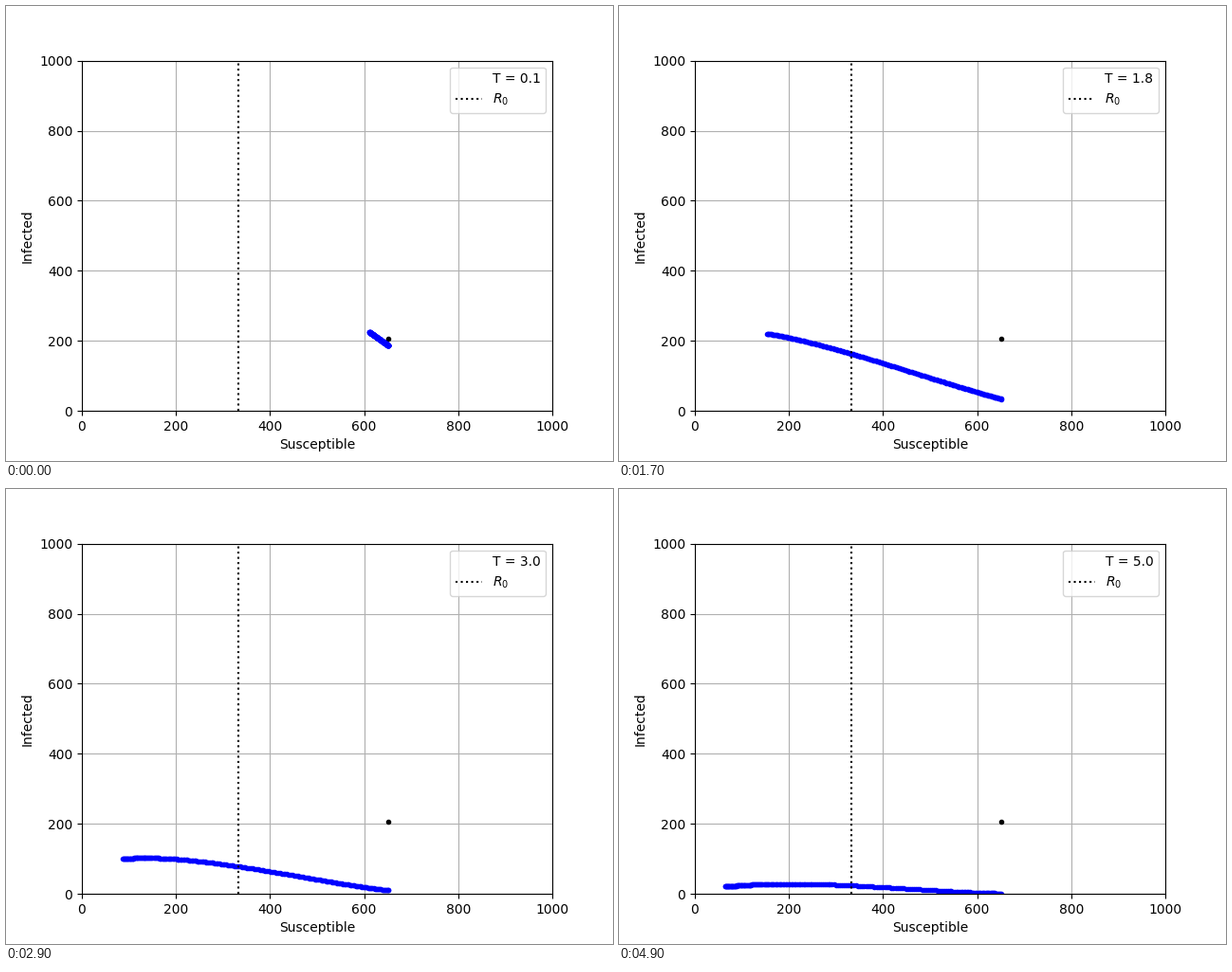
A matplotlib script for the animation above (5000 ms loop, 640 by 480 pixels).

```python
import numpy as np
import matplotlib.pyplot as plt
from matplotlib.animation import FuncAnimation

POPULATION = 1000
BETA = 3.0
GAMMA = 1.0
FRAMES = 50
SUBSTEPS = 20
STEP = 0.1 / SUBSTEPS


def slope(state, beta):
    s, i = state
    infections = beta * s * i / POPULATION
    return np.array([-infections, infections - GAMMA * i])


def advance(state, beta, steps):
    """Integrate the SIR equations with fourth-order Runge-Kutta."""
    for _ in range(steps):
        k1 = slope(state, beta)
        k2 = slope(state + STEP / 2 * k1, beta)
        k3 = slope(state + STEP / 2 * k2, beta)
        k4 = slope(state + STEP * k3, beta)
        state = state + STEP / 6 * (k1 + 2 * k2 + 2 * k3 + k4)
    return state


# The epidemic runs freely for three time units before policies diverge.
start = advance(np.array([POPULATION - 1.0, 1.0]), BETA, 30 * SUBSTEPS)

# Each point of the front has its own constant infection rate.
rates = np.linspace(0, BETA, 200)
front = np.repeat(start[:, None], rates.size, axis=1)
fronts = []
for _ in range(FRAMES):
    front = advance(front, rates, SUBSTEPS)
    fronts.append(front)

fig, ax = plt.subplots(figsize=(6.4, 4.8), dpi=100)
ax.plot(*start, "k.")
points, = ax.plot([], [], "b.")
clock, = ax.plot([], [], " ", label="T = 0.1")
ax.axvline(POPULATION * GAMMA / BETA, color="k", linestyle=":", label="$R_0$")
ax.set(xlim=(0, POPULATION), ylim=(0, POPULATION),
       xlabel="Susceptible", ylabel="Infected")
ax.grid(True)


def draw(frame):
    points.set_data(*fronts[frame])
    clock.set_label(f"T = {(frame + 1) / 10:.1f}")
    ax.legend(loc="upper right")
    return []


anim = FuncAnimation(fig, draw, frames=FRAMES, interval=100,
                     init_func=lambda: draw(0), repeat=True, repeat_delay=0)
plt.show()
```
